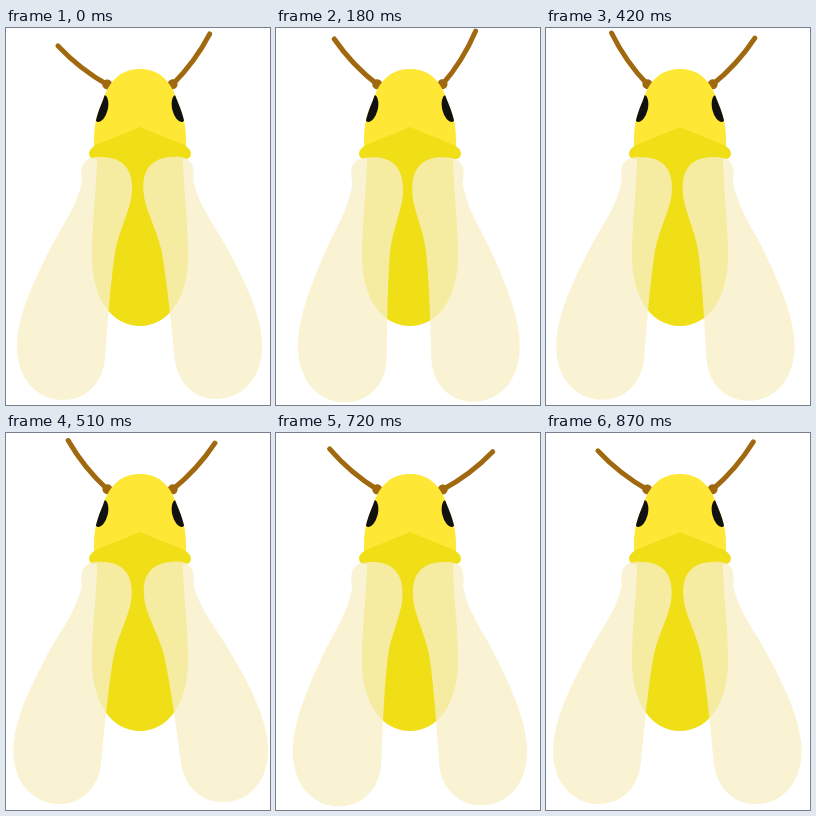
An HTML page with a canvas that plays this animation: 264 px wide and 377 px high, repeating every 900 ms.

```html
<!DOCTYPE html>
<html lang="en">
<head>
<meta charset="utf-8">
<title>Yellow insect</title>
<style>
  html, body { margin: 0; width: 100%; height: 100%; overflow: hidden; background: #fff; }
  canvas { display: block; width: 264px; height: 377px; }
</style>
</head>
<body>
<canvas id="stage" width="264" height="377"></canvas>
<script>
const ctx = document.getElementById("stage").getContext("2d");
const LOOP = 900, STEP = 30, AXIS = 263;

// Turning points of each swing: [time in ms, value].
// Wings are in px of inward swing, antennae in degrees.
const leftWing = [[130, 12], [540, -4], [675, 15], [785, -10]];
const rightWing = [[315, 18], [525, -11], [735, 1], [915, -4.5]];
const leftAntenna = [[50, 38], [325, 56.5], [840, 38]];
const rightAntenna = [[90, 60], [440, 47.5], [600, 47.5], [735, 36.7]];

const ease = u => (1 - Math.cos(Math.PI * u)) / 2;

// Eases from one turning point to the next, around the loop.
function swing(turns, t) {
  if (t < turns[0][0]) t += LOOP;
  const [firstTime, firstValue] = turns[0];
  const path = [...turns, [firstTime + LOOP, firstValue]];
  const next = path.findIndex(([time]) => time > t);
  const [t0, v0] = path[next - 1], [t1, v1] = path[next];
  return v0 + (v1 - v0) * ease((t - t0) / (t1 - t0));
}

const headPath = new Path2D(
  "M88 125 V112 C88 94 92 84 97 72 C104 51 116 41 134 41 C152 41 164 51 171 72 C176 84 180 94 180 112 V125 Z");
const thoraxPath = new Path2D(
  "M134 99 C148 105 164 111 178 117 Q184 120 185 125 Q185 131 179 131 H89 Q83 131 83 125 Q84 120 90 117 C104 111 120 105 134 99 Z");
const abdomenPath = new Path2D(
  "M91 128 H177 C177 160 182 190 182 228 C182 272 161 298 134 298 C107 298 86 272 86 228 C86 190 91 160 91 128 Z");
const wingPath = new Path2D(
  "M76 153 C73 135 80 129 92 129 C115 128 127 139 126 162 C126 179 114 199 109.5 222 C105 250 102 290 99 330 " +
  "C97 355 80 372 57 372 C32 372 11 352 11 318 C11 290 26 257 41 227 C54 200 70 182 76 153 Z");

function fill(path, color) {
  ctx.fillStyle = color;
  ctx.fill(path);
}

function mirrored(draw) {
  ctx.save();
  ctx.translate(AXIS, 0);
  ctx.scale(-1, 1);
  draw();
  ctx.restore();
}

function drawWing(inward) {
  ctx.save();
  ctx.translate(100, 145);
  ctx.rotate(-inward / 180);
  ctx.translate(-100, -145);
  fill(wingPath, "rgba(248, 240, 200, 0.78)");
  ctx.restore();
}

function drawAntenna(x, side, degrees) {
  ctx.save();
  ctx.translate(x, 57);
  ctx.scale(side, 1);
  ctx.rotate(-degrees * Math.PI / 180);
  ctx.strokeStyle = ctx.fillStyle = "#a0690f";
  ctx.lineWidth = 5;
  ctx.lineCap = "round";
  ctx.beginPath();
  ctx.moveTo(0, 0);
  ctx.quadraticCurveTo(32, 5, 63.5, 0);
  ctx.stroke();
  ctx.beginPath();
  ctx.arc(1, 0, 5, 0, Math.PI * 2);
  ctx.fill();
  ctx.restore();
}

function drawEye() {
  ctx.fillStyle = "#111";
  ctx.beginPath();
  ctx.ellipse(95, 80.5, 6.8, 13.8, 0.24, 0, Math.PI * 2);
  ctx.fill();
}

function drawBody() {
  fill(headPath, "#ffe736");
  ctx.save();
  ctx.clip(headPath);
  drawEye();
  ctx.translate(5, 0);
  mirrored(drawEye);
  ctx.restore();
  fill(abdomenPath, "#f0de16");
  fill(thoraxPath, "#f0de16");
}

function render(now) {
  const t = Math.floor(now % LOOP / STEP) * STEP;
  ctx.fillStyle = "#fff";
  ctx.fillRect(0, 0, 264, 377);
  drawAntenna(102, -1, swing(leftAntenna, t));
  drawAntenna(166, 1, swing(rightAntenna, t));
  drawBody();
  drawWing(swing(leftWing, t));
  mirrored(() => drawWing(swing(rightWing, t)));
}

let start;
function tick(now) {
  start ??= now;
  render(now - start);
  requestAnimationFrame(tick);
}
render(0);
requestAnimationFrame(tick);
</script>
</body>
</html>
```
